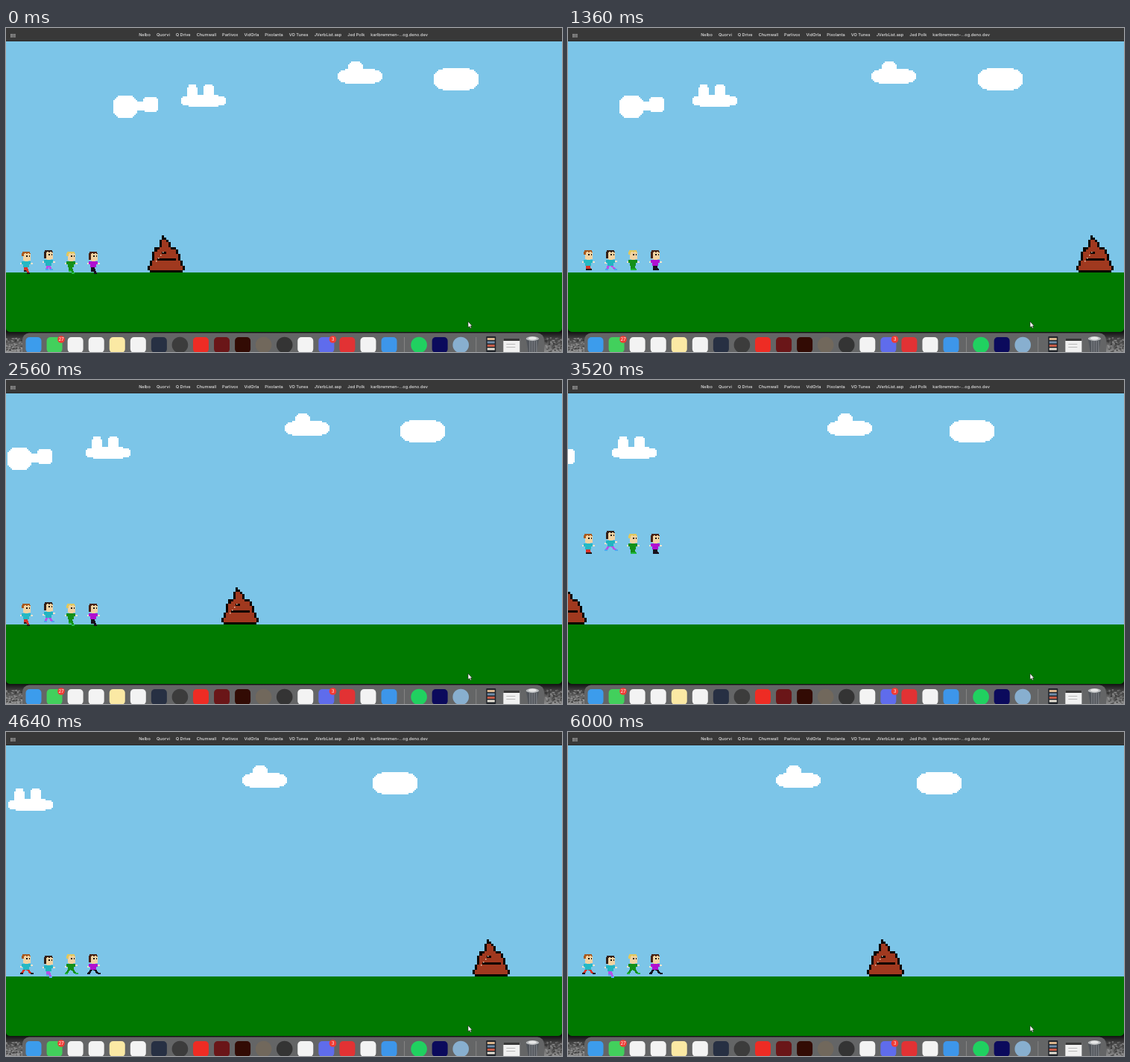
Write an HTML page with a canvas that moves like this. It is 746x436 px and loops after 6.08 s.

```html
<!DOCTYPE html>
<html lang="en">
<head>
<meta charset="utf-8">
<title>Runners</title>
<style>
html, body { margin: 0; width: 100%; height: 100%; overflow: hidden; background: #7cc5e8; }
canvas { position: absolute; left: 0; top: 0; }
nav {
  position: absolute; left: 0; top: 6px; width: 744px;
  display: flex; justify-content: center; gap: 8px;
  font: 500 5.6px/8px Inter, Roboto, sans-serif; color: #e2e2e2;
  white-space: nowrap; text-rendering: geometricPrecision;
}
</style>
</head>
<body>
<canvas id="stage" width="746" height="436"></canvas>
<nav>
  <span>Nelbo</span><span>Quorvi</span><span>Q Drive</span><span>Chumwall</span>
  <span>Parlivox</span><span>VidOrla</span><span>Pixolanta</span><span>VO Tunes</span>
  <span>JVerbList.asp</span><span>Jed Polk</span><span>karlbremmen-...og.deno.dev</span>
</nav>
<script>
const LOOP = 6080, STEP = 80;
const ctx = document.getElementById('stage').getContext('2d');
const lerp = (a, b, u) => a + (b - a) * u;

function box(color, x, y, w, h, radius = 0) {
  ctx.fillStyle = color;
  if (!radius) return ctx.fillRect(x, y, w, h);
  ctx.beginPath();
  ctx.roundRect(x, y, w, h, radius);
  ctx.fill();
}

function oval(color, x, y, rx, ry = rx) {
  ctx.fillStyle = color;
  ctx.beginPath();
  ctx.ellipse(x, y, rx, ry, 0, 0, 7);
  ctx.fill();
}

function seeded(seed) {
  return () => (seed = seed * 16807 % 2147483647) / 2147483647;
}

// Clouds are 60 by 30; puffs are blunt ovals: centre x, centre y, radii
const clouds = [
  { x: 144, y: 91, v: .0555, puffs: [[16, 15, 16, 15], [32, 14, 14, 7], [50, 12, 10, 11]] },
  { x: 235, y: 76, v: .05, puffs: [[30, 22, 30, 8], [15, 14, 7, 14], [37, 14, 8, 14]] },
  { x: 445, y: 45, v: .02767, puffs: [[30, 20, 30, 10], [24, 12, 10, 12]] },
  { x: 574, y: 54, v: .01767, puffs: [[30, 15, 30, 15]] }
];

function drawCloud({ x, y, v, puffs }, t) {
  const left = Math.round(x - v * t);
  const inside = (px, py) => puffs.some(([cx, cy, rx, ry]) =>
    Math.abs((px - cx) / rx) ** 3 + Math.abs((py - cy) / ry) ** 3 < 1);
  for (let py = 0; py < 30; py += 2)
    for (let px = 0; px < 60; px += 2)
      if (inside(px + 1, py + 1)) box('#fff', left + px, y + py, 2, 2);
}

// Every pass enters at 782, leaves at -82 and has its own speed
function heapX(t) {
  if (t < 1053) return 190 - .2583 * t;
  if (t < 3694) return 682 - .3273 * (t - 1360);
  return 626 - .1654 * (t - 4640);
}

// Tiers on a 16 by 16 grid: the span of columns widens from `from` to `to`
const tiers = [
  { rows: 5, from: [6, 6], to: [5, 9] },
  { rows: 6, from: [3, 11], to: [2, 13] },
  { rows: 4, from: [1, 14], to: [0, 15] },
  { rows: 1, from: [1, 14], to: [1, 14] }
];

function drawHeap(t) {
  const left = Math.round(heapX(t)), size = 3.125, dark = '#080402';
  const span = (color, a, b, row) => {
    const x = Math.round(a * size), y = Math.round(row * size);
    box(color, left + x, 279 + y, Math.round((b + 1) * size) - x, Math.round((row + 1) * size) - y);
  };
  let row = 0, above = [9, 0];
  for (const { rows, from, to } of tiers)
    for (let k = 0; k < rows; k++, row++) {
      const u = Math.min(1, k / 3);
      const [a, b] = [0, 1].map(i => Math.round(lerp(from[i], to[i], u)));
      span(dark, a, b, row);
      // Cells not covered by the row above stay dark as the outline
      const inner = [Math.max(a + 1, above[0]), Math.min(b - 1, above[1])];
      if (row < 15 && inner[0] <= inner[1]) span('#a0391f', ...inner, row);
      above = [a, b];
    }
  span(dark, 4, 11, 10);
  span(dark, 6, 7, 7);
  for (let i = 0; i < 4; i++) box('#e8c8b0', left + 20 - 3 * i, 301 + 4 * i, 1.5, 1.5);
}

const runners = [
  { hair: '#a85a20', shirt: '#25b8c4', legs: '#d8342a', feet: '#201818', jumps: [90, 2943] },
  { hair: '#332018', shirt: '#22b4c0', legs: '#b850e8', feet: '#50a8f0', longHair: true, shift: .6, jumps: [314, 2980] },
  { hair: '#e0c860', shirt: '#149018', legs: '#149018', feet: '#20b840', jumps: [90, 2943] },
  { hair: '#4a2414', shirt: '#b010d0', legs: '#18101c', feet: '#18101c', longHair: true, jumps: [90, 2943] }
];

function jumpHeight(jumps, t) {
  const u = Math.max(...jumps.filter(s => s <= t).map(s => 1 - (t - s) / 900).map(r => r > 0 ? r : 0), 0);
  return 400 * u * (1 - u);
}

function drawRunner({ hair, shirt, legs, feet, longHair, shift = 0, jumps }, i, t) {
  const phase = (t / STEP * .404 + shift) % 1;
  const stride = Math.max(0, Math.sin((phase - .12) * 2 * Math.PI));
  const lift = Math.abs(phase - .55) < .35 ? 2 : 0;
  const x0 = 27 + 30 * i, top = Math.round(301 - lift - jumpHeight(jumps, t));
  const part = (color, x, y, w, h) => box(color, x0 + Math.round(x), top + Math.round(y), w, h);

  for (const side of [-1, 1]) {
    const footX = side * (2 + 5 * stride) - 1;
    const footY = !lift && side > 0 ? 28 : 25;
    for (let u = 0; u < 1; u += .2) part(legs, lerp(side - 2, footX, u), lerp(19, footY, u), 3, 2);
    part(feet, footX, footY, 4, 2);
    part('#f5e2cc', side * 7 - 1, 15 - side * stride, 3, 2);
  }
  part(shirt, -6, 13, 12, 4);
  part(shirt, -4, 17, 8, 4);
  part('#f2d3a2', -4, 2, 10, 10);
  part('#f2d3a2', -2, 12, 5, 1);
  part(hair, -5, 0, 10, 2);
  part(hair, -6, 2, 3, longHair ? 9 : 4);
  for (let x = -4; x < 6; x += 4) part(hair, x, 2, 2, 1);
  part('#141414', 0, 5, 2, 2);
  part('#141414', 4, 5, 1, 2);
}

function drawDesktop() {
  const shade = ctx.createLinearGradient(0, 408, 0, 436);
  shade.addColorStop(0, '#0c0c0c');
  shade.addColorStop(.4, '#484848');
  shade.addColorStop(1, '#8c8c8c');
  box(shade, 0, 404, 746, 32);
  const random = seeded(7);
  for (let i = 0; i < 160; i++) {
    const x = (i % 2) * 724 + random() * 22;
    oval(random() < .5 ? '#b0b0b090' : '#28282890', x, 417 + random() * 19, 1.4, .8);
  }
}

// Dock groups; a leading "o" marks a round icon
const WHITE = '#f3f3f3';
const dock = [
  ['#3c9cec', '#42d05c', WHITE, WHITE, '#fbe9a4', WHITE, '#273043', 'o#3c3c3c', '#ee2c24',
   '#6a1618', '#320b04', 'o#71685c', 'o#343434', WHITE, '#5f6cec', '#e23234', WHITE, '#3d96ea'],
  ['o#20d160', '#0b0a5c', 'o#88afcf']
];
const dockX = (i, group) => 37 + 28.06 * i + 12 * group;

function badge(x, label) {
  oval('#f03b34', x, 419, 4.8);
  ctx.fillStyle = '#fff';
  ctx.font = '6px Inter, Roboto, sans-serif';
  ctx.textAlign = 'center';
  ctx.fillText(label, x, 421.2);
}

function drawDock() {
  box('#646566', 22, 410.5, 700, 40, 9);
  let i = 0;
  dock.forEach((group, g) => {
    for (const icon of group) {
      const x = dockX(i++, g);
      if (icon[0] === 'o') oval(icon.slice(1), x, 426.5, 10.8);
      else box(icon, x - 10.5, 416, 21, 21, 5);
    }
    box('#858585', dockX(i - .5, g + .5), 416, 1, 20);
  });
  badge(74, '27');
  badge(438.5, '3');

  const [phone, sheet, bin] = [0, 1, 2].map(k => dockX(i + k, 2));
  box('#20242a', phone - 6, 415, 13, 21, 1);
  ['#d9b48c', '#6e8ca8', '#c45c48', '#e4e0d4'].forEach((c, k) => box(c, phone - 4.5, 417 + k * 4.5, 10, 3));
  box('#f0f0f0', sheet - 11, 418, 22, 18);
  box('#383838', sheet - 11, 418, 22, 3);
  for (const y of [425, 429]) box('#b8b8b8', sheet - 7, y, 12, 1);
  for (let y = 418; y < 436; y++) box('#50545a', bin - 8.5 + (y - 418) / 6, y, 17 - (y - 418) / 3, 1);
  for (let k = -4; k < 7; k += 3) box('#888c90', bin + k, 421, 1, 15);
  oval('#b8bbbd', bin, 418, 8.7, 3);
  oval('#e6e6e6', bin, 417.5, 5.5, 2);
}

function drawCursor() {
  const arrow = new Path2D('M620 395v8l1.8-1.6 1.3 2.7 1.3-.6-1.2-2.6h2.2z');
  ctx.fillStyle = '#fff';
  ctx.strokeStyle = '#222';
  ctx.lineWidth = .6;
  ctx.fill(arrow);
  ctx.stroke(arrow);
}

function draw(t) {
  drawDesktop();
  box('#7cc5e8', 0, 17, 746, 320);
  box('#007900', 0, 329, 746, 80, [0, 0, 5, 5]);
  clouds.forEach(c => drawCloud(c, t));
  drawHeap(t);
  runners.forEach((r, i) => drawRunner(r, i, t));

  box('#383838', 0, 0, 746, 17);
  box('#2a2a2a', 0, 17, 746, 1);
  for (let i = 0; i < 9; i++) box('#a8a8a8', 6 + i % 3 * 2.4, 8 + Math.floor(i / 3) * 1.7, 1.9, 1.2);

  drawDock();
  drawCursor();
}

function tick() {
  const t = performance.now() % LOOP;
  draw(Math.floor(t / STEP) * STEP);
  requestAnimationFrame(tick);
}
tick();
</script>
</body>
</html>
```
